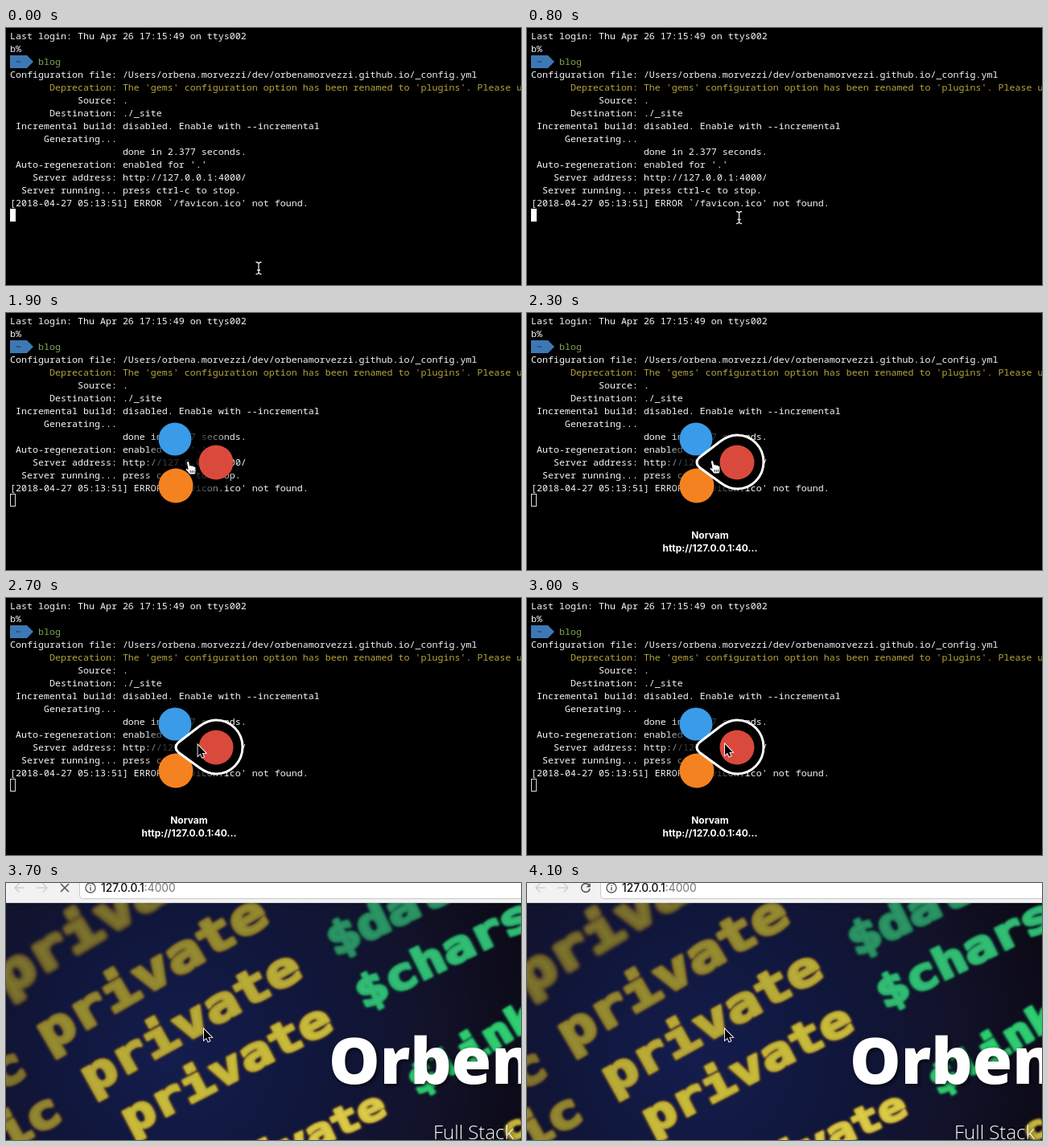
Write an HTML page with a canvas that moves like this. It is 640 px wide and 320 px high and loops after 4200 ms.

```html
<!DOCTYPE html>
<html lang="en">
<head>
<meta charset="utf-8">
<title>Choosing a browser from the terminal</title>
<style>
  html, body { margin: 0; width: 100%; height: 100%; overflow: hidden; background: #000; }
  canvas { display: block; width: 640px; height: 320px; }
</style>
</head>
<body>
<canvas id="stage" width="640" height="320"></canvas>
<script>
const W = 640, H = 320, LOOP = 4200, STEP = 100;
const ctx = document.getElementById('stage').getContext('2d');

const MONO = '"Noto Sans Mono", "DejaVu Sans Mono", monospace';
const UI = 'Inter, "Liberation Sans", sans-serif';
const SANS = '"Open Sans", "Noto Sans", sans-serif';

// Moments, in ms
const LINK_ON = 1300, MENU_ON = 1900, PICK_ON = 2200, ARROW_ON = 2600,
      PAGE_ON = 3100, PHOTO_ON = 3700, LOADED = 4000;

// Pointer hot spot: time, x, y
const PATH = [
  [0, 314, 299], [100, 314, 299], [600, 286, 266], [1100, 227, 186],
  [1900, 227, 185], [2300, 231, 184], [2500, 231, 184], [2900, 246, 182], [LOOP, 246, 182]
];

function pointerAt(t) {
  const i = PATH.findIndex(p => p[0] > t);
  const [t0, x0, y0] = PATH[i - 1], [t1, x1, y1] = PATH[i];
  const k = (t - t0) / (t1 - t0);
  return [x0 + (x1 - x0) * k, y0 + (y1 - y0) * k];
}

function text(c, str, x, y, font, color, align = 'left') {
  c.font = font;
  c.fillStyle = color;
  c.textAlign = align;
  c.fillText(str, x, y);
}

function disc(x, y, r, color) {
  ctx.fillStyle = color;
  ctx.beginPath();
  ctx.arc(x, y, r, 0, Math.PI * 2);
  ctx.fill();
}

function stroke(d, color, width) {
  ctx.strokeStyle = color;
  ctx.lineWidth = width;
  ctx.stroke(new Path2D(d));
}

/* ---------- terminal ---------- */

const CELL = 7, ROW = 16, LEFT = 5;
const URL_TEXT = 'http://127.0.0.1:4000/';
const LINES = [
  'Last login: Thu Apr 26 17:15:49 on ttys002',
  'b%',
  '',
  'Configuration file: /Users/orbena.morvezzi/dev/orbenamorvezzi.github.io/_config.yml',
  "       Deprecation: The 'gems' configuration option has been renamed to 'plugins'. Please update",
  '            Source: .',
  '       Destination: ./_site',
  ' Incremental build: disabled. Enable with --incremental',
  '      Generating...',
  '                    done in 2.377 seconds.',
  " Auto-regeneration: enabled for '.'",
  '    Server address:',
  '  Server running... press ctrl-c to stop.',
  "[2018-04-27 05:13:51] ERROR `/favicon.ico' not found."
];

function put(str, col, row, color) {
  text(ctx, str, LEFT + col * CELL, 14 + row * ROW, `11.667px ${MONO}`, color);
}

function terminal(t) {
  const linked = t >= LINK_ON && t < MENU_ON;
  ctx.fillStyle = '#000';
  ctx.fillRect(0, 0, W, H);
  LINES.forEach((line, row) => put(line, 0, row, row === 4 ? '#b7a53e' : '#f6f6f6'));

  ctx.fillStyle = '#3d78b5';
  ctx.fill(new Path2D('M5 34H26L34 42L26 50H5Z'));
  put('~', 1, 2, '#10253c');
  put('blog', 5, 2, '#7fa650');

  put(URL_TEXT, 20, 11, linked ? '#2a58a5' : '#f6f6f6');
  if (linked) {
    ctx.fillStyle = '#2a58a5';
    ctx.fillRect(145, 192, URL_TEXT.length * CELL, 1);
  }

  if (t < MENU_ON) {
    ctx.fillStyle = '#fff';
    ctx.fillRect(5, 225, 7, 16);
  } else {
    ctx.strokeStyle = '#ddd';
    ctx.lineWidth = 1;
    ctx.strokeRect(5.5, 225.5, 6, 15);
  }
}

/* ---------- browser menu ---------- */

function menu(t) {
  const shade = ctx.createRadialGradient(228, 186, 34, 228, 186, 58);
  shade.addColorStop(0, 'rgba(0,0,0,.78)');
  shade.addColorStop(1, 'rgba(0,0,0,0)');
  ctx.fillStyle = shade;
  ctx.fillRect(168, 126, 120, 120);

  disc(210, 157, 20.5, '#3a9be8');
  disc(211, 215, 21.5, '#f58220');
  if (t >= PICK_ON) {
    const drop = 'M214 180L240 160C248 154 254 152 261 152A33 33.5 0 0 1 261 219' +
                 'C254 219 248 217 240 211L214 192Q208 186 214 180Z';
    ctx.fillStyle = '#000';
    ctx.fill(new Path2D(drop));
    stroke(drop, '#fff', 3);
    const font = `700 12px ${UI}`;
    text(ctx, 'Norvam', 227.5, 281, font, '#fff', 'center');
    text(ctx, 'http://127.0.0.1:40...', 227.5, 297, font, '#fff', 'center');
  }
  disc(261, 186, 21.5, '#da4a3c');
}

/* ---------- web page ---------- */

// Soft word on a tilted screen; x, y is the middle of its first letter
function slanted(c, str, x, y, deg, size, color, edge, blur) {
  c.save();
  c.translate(x, y);
  c.rotate(-deg * Math.PI / 180);
  c.scale(1, 0.8);
  c.filter = `blur(${blur}px)`;
  c.lineJoin = 'round';
  c.font = `700 ${size}px "DejaVu Sans Mono", monospace`;
  c.fillStyle = color;
  for (const [width, tint] of [[7, edge], [3, color]]) {
    c.lineWidth = width;
    c.strokeStyle = tint;
    c.strokeText(str, -size * 0.3, size * 0.27);
  }
  c.fillText(str, -size * 0.3, size * 0.27);
  c.restore();
}

function makePhoto() {
  const cv = document.createElement('canvas');
  cv.width = W;
  cv.height = H;
  const c = cv.getContext('2d');
  const tone = c.createRadialGradient(210, 220, 20, 240, 200, 420);
  tone.addColorStop(0, '#131c4b');
  tone.addColorStop(0.4, '#10163a');
  tone.addColorStop(0.7, '#12122a');
  tone.addColorStop(1, '#0c0a16');
  c.fillStyle = tone;
  c.fillRect(0, 0, W, H);

  const yellow = (str, x, y, deg, size, color, blur) =>
    slanted(c, str, x, y, deg, size, color, '#5e4428', blur);
  const green = (str, x, y, deg, size, color, blur) =>
    slanted(c, str, x, y, deg, size, color, '#12553f', blur);

  yellow('private', 13, 113, 31, 80, '#7d752c', 2.5);
  yellow('private', 64, 184, 30.2, 76, '#958b30', 1.8);
  yellow('private', 117, 239, 29, 72, '#b8ab37', 1.3);
  yellow('private', 166, 291, 27.4, 68, '#c8bb3a', 1);
  yellow('private', 264, 372, 25, 58, '#dccb46', 0.8);
  yellow('c', 2, 235, 29, 72, '#80752c', 1.8);
  yellow('ic', 10, 311, 29, 70, '#938831', 1.5);
  yellow('c', 632, 308, 26, 46, '#c8bb3a', 0.8);
  green('$data', 421, 70, 26, 67, '#2c9566', 1.6);
  green('$chars', 456, 136, 26.5, 66, '#32bd74', 1.2);
  green('$link', 520, 245, 31, 59, '#2fcf70', 0.8);

  c.shadowColor = 'rgba(0,0,0,.75)';
  c.shadowBlur = 5;
  c.shadowOffsetX = c.shadowOffsetY = 2;
  text(c, 'Orbena Morvezzi', 401, 250, `800 80px ${SANS}`, '#fff');
  text(c, 'Full Stack', 531, 319, `300 24px ${SANS}`, '#fff');
  return cv;
}

const photo = makePhoto();

function toolbar(t) {
  ctx.fillStyle = '#f2f2f2';
  ctx.fillRect(0, 0, W, 24);
  ctx.fillStyle = '#cfcfcf';
  ctx.fillRect(0, 24, W, 1);
  ctx.fillStyle = '#fff';
  const field = 'M650 19.5H95.5Q91.5 19.5 91.5 15.5V-4H650Z';
  ctx.fill(new Path2D(field));
  stroke(field, '#cacaca', 1);

  stroke('M23 6H11M16.5 0.5L11 6L16.5 11.5', '#cfcfcf', 1.5);
  stroke('M38 6H51M45.5 0.5L51 6L45.5 11.5', '#cfcfcf', 1.5);
  if (t < LOADED) {
    stroke('M68 1L78 11M78 1L68 11', '#555', 1.6);
  } else {
    stroke('M77 2.5A5.3 5.3 0 1 0 78.2 7', '#555', 1.6);
    ctx.fillStyle = '#555';
    ctx.fill(new Path2D('M78.8 0V5.2H73.6Z'));
  }
  stroke('M111 6A6 6 0 1 1 99 6A6 6 0 1 1 111 6M105 5V9.5M105 2.4V4', '#5a5a5a', 1.4);

  const host = '127.0.0.1';
  text(ctx, host, 118, 11, `500 13.8px ${UI}`, '#111');
  const w = ctx.measureText(host).width;
  text(ctx, ':4000', 118 + w, 11, `13.8px ${UI}`, '#777');
}

function page(t) {
  ctx.fillStyle = '#fff';
  ctx.fillRect(0, 0, W, H);
  if (t >= PHOTO_ON) ctx.drawImage(photo, 0, 0);
  toolbar(t);
  ctx.fillStyle = '#222';
  ctx.fill(new Path2D('M0 317Q0 320 3 320H0ZM640 317Q640 320 637 320H640Z'));
}

/* ---------- pointer ---------- */

const BEAM = 'M-3.5 -7.5Q0 -7.5 0 -5V5Q0 7.5 -3.5 7.5M3.5 -7.5Q0 -7.5 0 -5M0 5Q0 7.5 3.5 7.5M-2 2.5H2';
const HAND = 'M-2.5 1.5Q-2.5 -.5 -1 -.5Q.5 -.5 .8 1.5L1.6 5Q3 4 4 5.3Q5.5 4.6 6.3 6Q8.3 5.6 8.8 7.5' +
             'L9 11Q9 13 8 16H1Q-1 13 -3.5 10.5Q-4.5 8.5 -2.5 8.5L-1 9.5Z';
const ARROW = 'M0 0V13.5L3.1 10.7L5.2 15.6L7.4 14.6L5.3 9.9H9.6Z';

function pointer(t) {
  const [x, y] = pointerAt(t);
  ctx.save();
  ctx.translate(x, y);
  if (t < LINK_ON) {
    // The beam's middle sits a little below the fingertip
    const drop = 5 * Math.min(1, Math.max(0, (t - 600) / 500));
    ctx.translate(drop * 0.6, drop);
    stroke(BEAM, '#e8e8e8', 1.3);
  } else if (t < ARROW_ON) {
    ctx.fillStyle = '#fff';
    ctx.fill(new Path2D(HAND));
    stroke(HAND, '#000', 1);
    stroke('M2.2 11V14M4.4 11V14M6.6 11V14', '#000', 0.8);
  } else {
    stroke(ARROW, '#fff', 1.8);
    ctx.fillStyle = '#000';
    ctx.fill(new Path2D(ARROW));
  }
  ctx.restore();
}

function draw(t) {
  if (t < PAGE_ON) {
    terminal(t);
    if (t >= MENU_ON) menu(t);
  } else {
    page(t);
  }
  pointer(t);
}

const start = performance.now();
let last = -1;

function tick() {
  const now = Math.max(0, performance.now() - start) % LOOP;
  const t = Math.floor(now / STEP) * STEP;
  if (t !== last) draw(last = t);
  requestAnimationFrame(tick);
}
tick();
</script>
</body>
</html>
```
